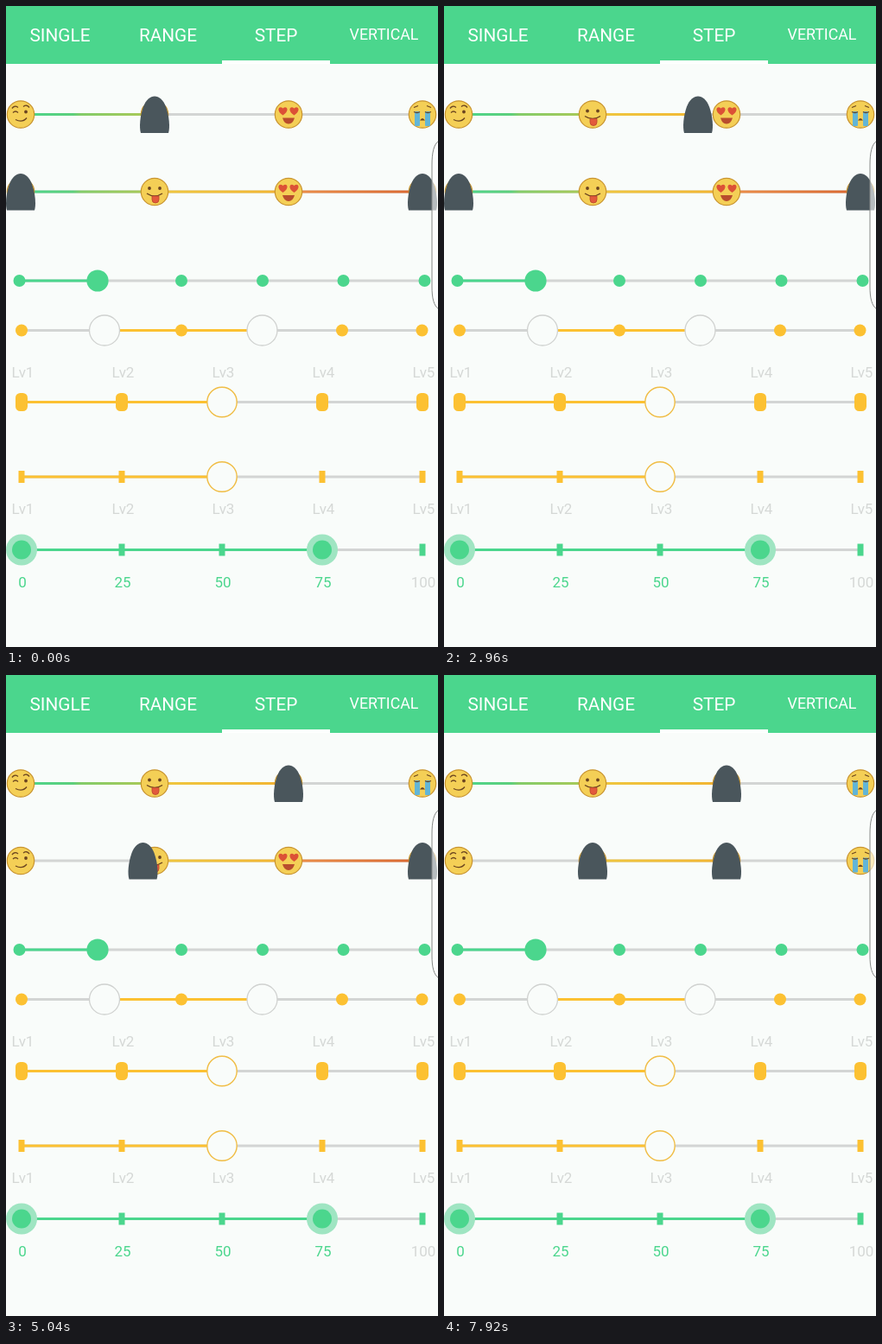
An HTML page with a canvas that plays this animation: 500 px wide and 742 px high, repeating every 8000 ms.

```html
<!DOCTYPE html>
<html lang="en">
<head>
<meta charset="utf-8">
<title>Step sliders</title>
<style>
html, body { margin: 0; width: 100%; height: 100%; overflow: hidden; background: #f9fcfa; }
canvas { display: block; width: 500px; height: 742px; }
</style>
</head>
<body>
<canvas id="stage" width="500" height="742"></canvas>
<script>
const g = document.getElementById('stage').getContext('2d');
const LOOP = 8000, STEP = 80;
const GREEN = '#4bd68d', YELLOW = '#fcc132', GREY = '#d3d5d4', PAPER = '#f9fcfa', HOOD = '#4a565c';
const STOPS = [17, 172, 327, 482];
const FIFTHS = [18, 134, 250, 366, 482];

// Thumb positions as [ms, x] keys; equal neighbouring times make a jump.
const TOP = [[0, 172], [960, 172], [1200, 192], [1680, 243], [1760, 243], [1760, 172],
  [2320, 172], [2960, 294], [3120, 304], [3360, 312], [3360, 327]];
const LEFT = [[0, 17], [4160, 17], [4560, 82], [4960, 147], [5120, 170], [5280, 177], [5360, 177], [5360, 172]];
const RIGHT = [[0, 482], [5840, 482], [6080, 467], [6160, 467], [6800, 346], [6960, 334], [6960, 327]];

function at(keys, t) {
  let a = keys[0];
  for (const b of keys) {
    if (b[0] > t) return a[1] + (b[1] - a[1]) * (t - a[0]) / (b[0] - a[0]);
    a = b;
  }
  return a[1];
}

function shape(fill, stroke, width = 1) {
  if (fill) { g.fillStyle = fill; g.fill(); }
  if (stroke) { g.strokeStyle = stroke; g.lineWidth = width; g.stroke(); }
}
function disc(x, y, r, fill, stroke, width) {
  g.beginPath();
  g.arc(x, y, r, 0, 7);
  shape(fill, stroke, width);
}
function box(x, y, w, h, r, fill) {
  g.beginPath();
  g.roundRect(x - w / 2, y - h / 2, w, h, r);
  shape(fill);
}
function line(x1, x2, y, color) {
  g.fillStyle = color;
  g.fillRect(x1, y - 1.5, x2 - x1, 3);
}
function curve(d, fill, stroke, width) {
  const p = new Path2D(d);
  if (fill) { g.fillStyle = fill; g.fill(p); }
  if (stroke) { g.strokeStyle = stroke; g.lineWidth = width || 1.3; g.stroke(p); }
}
function text(s, x, y, size, color) {
  g.font = size + 'px Roboto, "Open Sans", sans-serif';
  g.textAlign = 'center';
  g.fillStyle = color;
  g.fillText(s, x, y);
}
function place(x, y, draw) {
  g.save();
  g.translate(x, y);
  draw();
  g.restore();
}

const INK = '#6b4420';
const dots = () => [-6, 6].forEach(x => disc(x, -4, 1.9, INK));
const faces = [
  () => {
    curve('M-10-7Q-7-11-3-8M3-9Q7-12 10-8M-9-2Q-6-5-3-2M-6 6Q2 10 7 4', null, INK);
    disc(6, -3, 1.9, INK);
  },
  () => {
    dots();
    curve('M-9 2Q0 8 9 2', null, INK, 1.5);
    curve('M-3 5H5V9A4 4 0 0 1-3 9Z', '#e25a3c', '#b9442b', .8);
  },
  () => {
    for (const x of [-6.5, 6.5]) place(x, -4, () =>
      curve('M0 5C-9-1-4-7 0-3C4-7 9-1 0 5Z', '#dc5136'));
    curve('M-7 4H7Q5 11 0 11Q-5 11-7 4Z', '#b94d2d');
  },
  () => {
    for (const x of [-6, 6]) box(x, 5, 6, 17, 1, '#62b5d6');
    curve('M-10-3Q-6-1-3-3M3-3Q6-1 10-3M-10-8L-5-10M10-8L5-10', null, INK);
    curve('M-3 7Q0 2 3 7Z', INK);
  }
];

function emoji(x, y, i) {
  place(x, y, () => {
    disc(0, 0, 15.7, '#f4cf56', '#c9942f', 1.2);
    faces[i]();
  });
}
function hood(x, y) {
  place(x, y, () =>
    curve('M-16 21.5C-18 15-17 2-13-9C-10-17-5-21 0-21C5-21 10-17 13-9C17 2 18 15 16 21.5Z', HOOD));
}

const ramp = g.createLinearGradient(17, 0, 482, 0);
[[0, GREEN], [.13, '#5dcf7c'], [.15, '#84cc69'], [.33, '#adc956'], [.36, '#efc63f'],
 [.62, '#f2b733'], [.7, '#ea8c48'], [1, '#d9662f']].forEach(s => ramp.addColorStop(...s));

function faceSlider(y, from, to, thumbs) {
  line(17, 482, y, GREY);
  line(from, to, y, ramp);
  STOPS.forEach((x, i) => emoji(x, y, i));
  thumbs.forEach(x => hood(x, y));
}

function slider(y, x1, x2, from, to, color, marks, mark) {
  line(x1, x2, y, GREY);
  line(from, to, y, color);
  marks.forEach(x => mark(x, y));
}
function levels(y) {
  FIFTHS.forEach((x, i) => text('Lv' + (i + 1), x + 1.5, y, 17, '#d5d8d6'));
}

function header() {
  g.fillStyle = GREEN;
  g.fillRect(0, 0, 500, 67);
  ['SINGLE', 'RANGE', 'STEP', 'VERTICAL'].forEach((s, i) =>
    text(s, 62.5 + 125 * i, i < 3 ? 40.5 : 39, i < 3 ? 20.8 : 17.8, '#fff'));
  g.fillStyle = '#fff';
  g.fillRect(250, 63, 125, 4);
}

function draw(t) {
  g.fillStyle = PAPER;
  g.fillRect(0, 0, 500, 742);
  header();

  const top = at(TOP, t), left = at(LEFT, t), right = at(RIGHT, t);
  faceSlider(125.5, 17, top, [top]);
  faceSlider(215, left, right, [left, right]);

  slider(318, 15, 485, 15, 106, GREEN, [15.5, 203, 297, 390.5, 484.5], (x, y) => disc(x, y, 7, GREEN));
  disc(106, 318, 12.6, GREEN);

  slider(375.5, 18, 482, 114, 297, YELLOW, [18, 203, 389, 481.5], (x, y) => disc(x, y, 7, YELLOW));
  for (const x of [114, 296.5]) disc(x, 375.5, 17.5, PAPER, '#d0d2d0', 1.3);

  levels(430);
  slider(458.5, 18, 482, 18, 250, YELLOW, FIFTHS, (x, y) => box(x, y, 14, 21, 5.5, YELLOW));
  slider(545, 18, 482, 18, 250, YELLOW, FIFTHS, (x, y) => box(x, y, 7, 14, 0, YELLOW));
  for (const y of [458.5, 545]) disc(250, y, 17.2, PAPER, '#f0bd45', 1.4);
  levels(588);

  slider(629.5, 18, 482, 18, 366, GREEN, FIFTHS, (x, y) => box(x, y, 7, 14, 0, GREEN));
  for (const x of [18, 366]) {
    disc(x, 629.5, 18, '#9fe5c2');
    disc(x, 629.5, 11, GREEN);
  }
  FIFTHS.forEach((x, i) => text(25 * i, x + 1, 672.5, 17, i < 4 ? GREEN : '#d5d8d6'));

  // Translucent panel at the right edge
  curve('M501 156C495 160 493 170 493 184V325C493 338 495 347 501 351Z', 'rgba(255,255,255,.6)', '#858886', 1);
}

const start = performance.now();
function tick() {
  const t = (performance.now() - start) % LOOP;
  draw(Math.floor(t / STEP) * STEP);
  requestAnimationFrame(tick);
}
tick();
</script>
</body>
</html>
```
